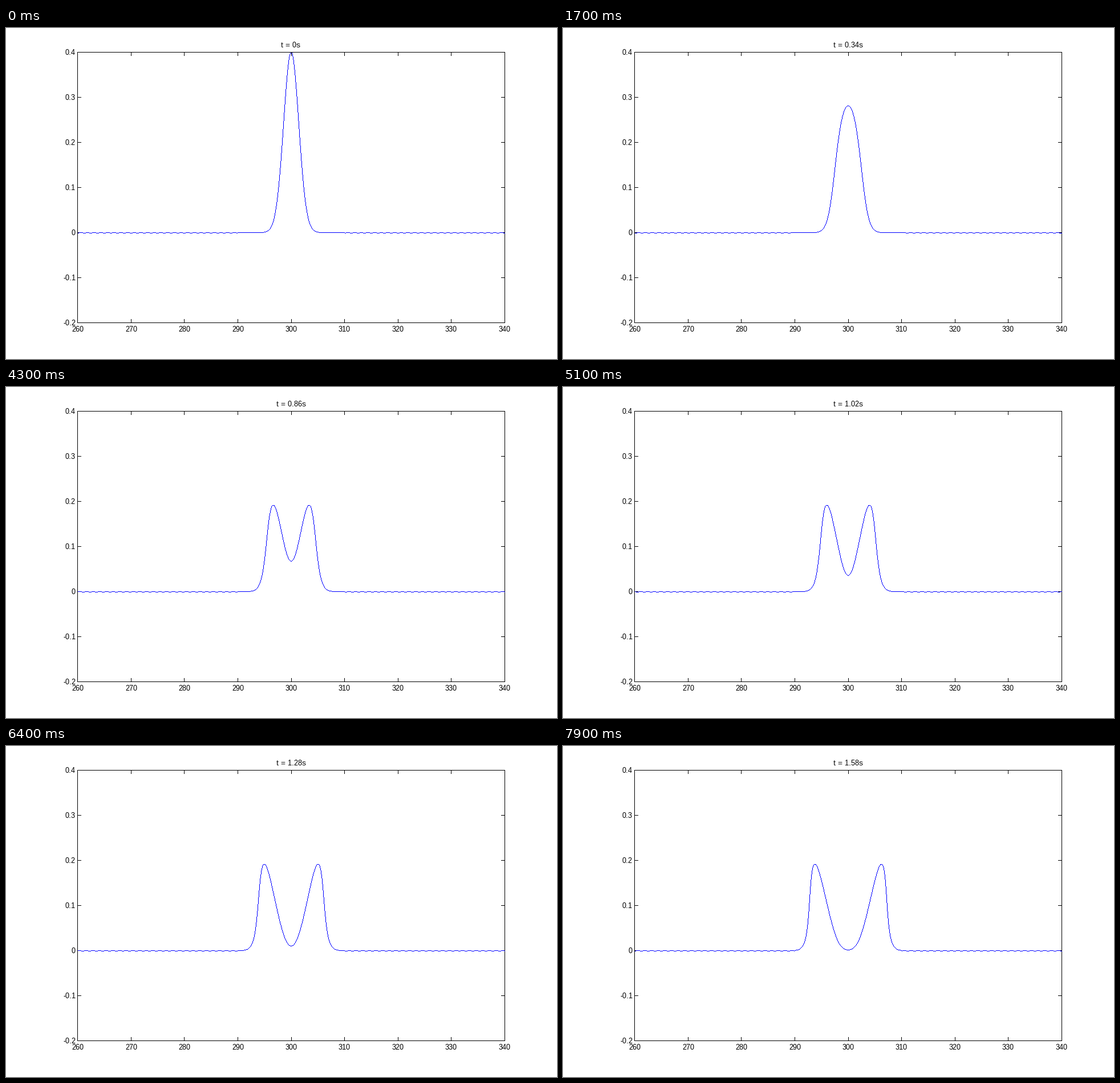
A matplotlib script that plays this animation: 966 px wide and 580 px high, repeating every 8 s.

```python
import numpy as np
import matplotlib as mpl
import matplotlib.pyplot as plt
from matplotlib.animation import FuncAnimation
from matplotlib.collections import LineCollection
from matplotlib.transforms import Bbox

mpl.rcParams.update({
    "font.family": "Liberation Sans",
    "text.hinting": "default",
    "text.hinting_factor": 1,
})

W, H, DPI = 966, 580, 64
PX = 72 / DPI                       # one pixel in points
FRAMES, INTERVAL, DT = 80, 100, 0.02
LEFT, RIGHT, TOP, BOTTOM = 125, 874, 42, 516    # pixel indices of the box
G, DEPTH = 9.81, 1.0


def col(x):
    return LEFT + (x - 260) / 80 * (RIGHT - LEFT)


def row(y):
    return TOP + (0.4 - y) / 0.6 * (BOTTOM - TOP)


def snap(v):
    return np.floor(v + 0.5 + 1e-9)


def solve(substeps=5, dx=0.05):
    """Shallow-water collapse of a hump at rest (RK4, 4th-order differences)."""
    x = np.arange(-20, 20, dx)

    def ddx(f):
        near = np.roll(f, -1) - np.roll(f, 1)
        far = np.roll(f, -2) - np.roll(f, 2)
        return (8 * near - far) / (12 * dx)

    def rate(q):
        eta, u = q
        return -np.array([ddx((DEPTH + eta) * u), ddx(u * u / 2 + G * eta)])

    q = np.array([0.4 * np.exp(-x**2 / 4), 0 * x])
    dt = DT / substeps
    levels = []
    for _ in range(FRAMES):
        levels.append(q[0].copy())
        for _ in range(substeps):
            k1 = rate(q)
            k2 = rate(q + dt / 2 * k1)
            k3 = rate(q + dt / 2 * k2)
            k4 = rate(q + dt * k3)
            q = q + dt / 6 * (k1 + 2 * k2 + 2 * k3 + k4)
    return x, levels


grid, levels = solve()
cols = np.arange(LEFT + 1, RIGHT + 1)
edges = np.append(cols, RIGHT + 1) - 0.5
dist = (edges - LEFT) / (RIGHT - LEFT) * 80 - 40


def surface(i):
    eta = np.interp(dist, grid, levels[i], left=0, right=0)
    r = np.abs(dist)
    phase = 2 * np.pi * (r - np.sqrt(G * DEPTH) * DT * i) / 1.25
    return eta - 0.00065 * (r > 10) * (1 + np.cos(phase))


def runs(i):
    """One vertical run of whole pixels per column: an unsmoothed hairline."""
    y = snap(row(surface(i)))
    lo = np.minimum(y[:-1], y[1:])
    hi = np.maximum(np.maximum(y[:-1], y[1:]), lo + 1)
    x = cols + 0.5
    return np.stack([np.column_stack([x, lo]), np.column_stack([x, hi])], axis=1)


fig = plt.figure(figsize=(W / DPI, H / DPI), dpi=DPI, facecolor="white")
ax = fig.add_axes([0, 0, 1, 1])
ax.set_xlim(0, W)
ax.set_ylim(H, 0)
ax.axis("off")


def stroke(xs, ys):
    line, = ax.plot(xs, ys, color="black", lw=PX, solid_capstyle="butt")
    line.set_snap(False)


def hline(a, b, y):
    stroke([a, b], [y + 0.5, y + 0.5])


def vline(x, a, b):
    stroke([x + 0.5, x + 0.5], [a, b])


def label(x, y, s, ha):
    return ax.text(x, y, s, ha=ha, va="baseline", fontsize=13 * PX, color="black")


for y in (TOP, BOTTOM):
    hline(LEFT, RIGHT + 1, y)
for x in (LEFT, RIGHT):
    vline(x, TOP, BOTTOM + 1)

TICK = 7
for v in range(260, 341, 10):
    x = snap(col(v))
    vline(x, TOP, TOP + TICK)
    vline(x, BOTTOM + 1 - TICK, BOTTOM + 1)
    label(x + 0.5, 532, str(v), "center")

for k in range(-2, 5):
    y = snap(row(k / 10))
    hline(LEFT, LEFT + TICK, y)
    hline(RIGHT + 1 - TICK, RIGHT + 1, y)
    label(122, y + 5, f"{k / 10:g}", "right")

title = label(499.5, 34, "", "center")
wave = LineCollection(runs(0), colors="#0000ff", linewidths=PX,
                      capstyle="butt", zorder=5)
wave.set_snap(False)
ax.add_collection(wave, autolim=False)
wave.set_clip_box(Bbox([[LEFT + 1, H - BOTTOM], [RIGHT + 1, H - TOP - 1]]))


def update(i):
    wave.set_segments(runs(i))
    title.set_text(f"t = {round(i * DT, 2):g}s")
    return wave, title


anim = FuncAnimation(fig, update, frames=FRAMES, interval=INTERVAL,
                     repeat=True, repeat_delay=0)
plt.show()
```
